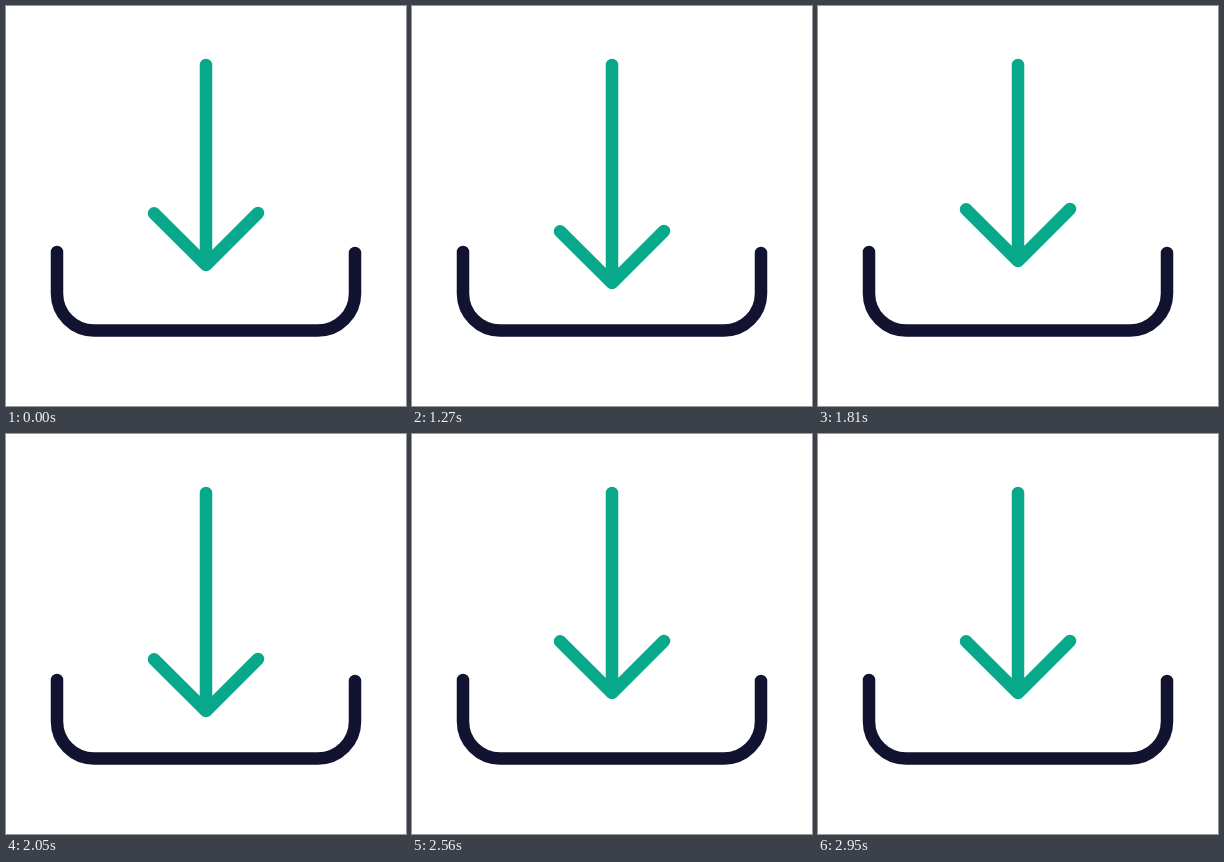
Write an HTML page that moves like this. It is 400 px wide and 400 px high and loops after 2.98 s.

```html
<!DOCTYPE html>
<html lang="en">
<head>
<meta charset="utf-8">
<title>Download</title>
<style>
  html, body { margin: 0; height: 100%; overflow: hidden; background: #fff; }
  svg { display: block; width: 100vw; height: 100vh; }
  path { fill: none; stroke-width: 12.5; stroke-linecap: round; stroke-linejoin: round; }
</style>
</head>
<body>
<svg viewBox="0 0 400 400">
  <path stroke="#121331" d="M51 246V287.5A37 37 0 0 0 88 324.5H312A37 37 0 0 0 349 287.5V247"/>
  <path id="arrow" stroke="#08a88a"/>
</svg>
<script>
  const LOOP = 2980, REST = 1000, STEP = 30;
  // Vertical offset of the arrow head over one bounce, one value per step
  const bounce = [0, -4, -7, -9, -10, -8, 15.5, 33, 27, 18, 12, 7.5, 3.5];
  const arrow = document.getElementById('arrow');

  function draw(time) {
    const step = Math.max(0, Math.floor((time % LOOP - REST) / STEP));
    const tip = 259 + bounce[step % bounce.length];
    arrow.setAttribute('d', `M200 59V${tip}M148 ${tip - 51.7}L200 ${tip}L252 ${tip - 52}`);
  }

  const start = performance.now();
  function tick() {
    draw(performance.now() - start);
    requestAnimationFrame(tick);
  }
  tick();
</script>
</body>
</html>
```
